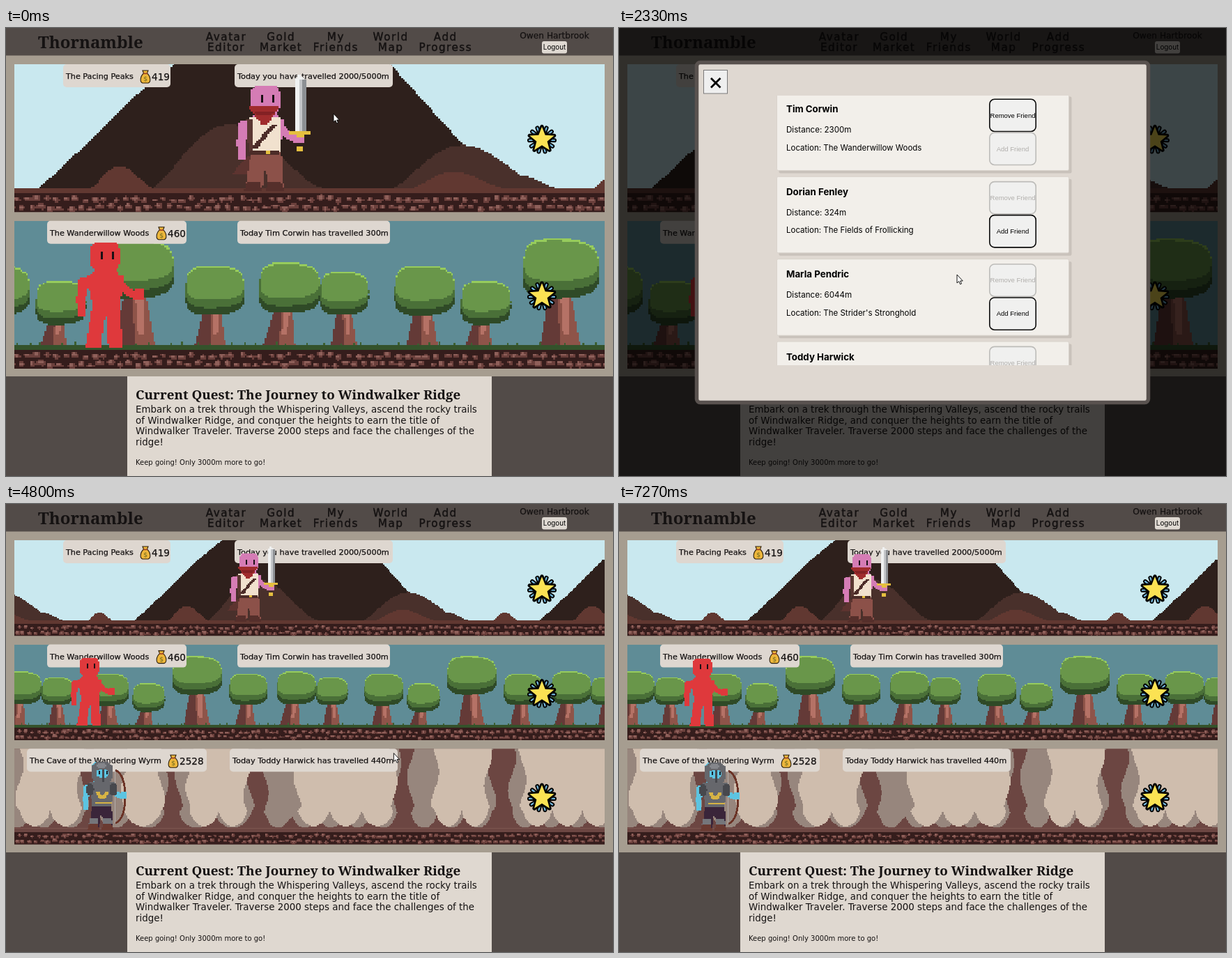
An HTML page for the animation above (7340 ms loop, 871 by 643 pixels).

```html
<!DOCTYPE html>
<html lang="en">
<head>
<meta charset="utf-8">
<title>Walking quest</title>
<style>
html, body { margin: 0; width: 100%; height: 100%; overflow: hidden; background: #524b48; }
svg { display: block; }
#stage { width: 871px; height: 643px; }
text { font-family: "DejaVu Sans", sans-serif; fill: #151212; white-space: pre; }
.bold { stroke: #151212; stroke-width: .25px; }
.nav { stroke: #151212; stroke-width: .45px; letter-spacing: 1.5px; }
.goth { font-family: "Noto Serif", serif; font-weight: 900; }
.card { font-family: Inter, sans-serif; fill: #000; }
.btn { font-family: "Liberation Sans", sans-serif; }
.tip { font-family: "Noto Sans", sans-serif; fill: #a09d9b; }
</style>
</head>
<body>
<svg id="stage" viewBox="0 0 871 643"></svg>
<script>
const LOOP = 7340, SMALL = .646, CELL = 2.65;
const OPEN = 1250, CLOSE = 4600;
const MIDX = 435.5, GROUND = 178, FEET = 182;
const stage = document.getElementById('stage');

let seed = 11;
const rnd = () => (seed = (seed * 16807) % 2147483647) / 2147483647;
const range = (n, f) => Array.from({ length: n }, (_, i) => f(i));
const art = (n, f) => range(n, f).join('');

// ---- drawing helpers ----
const rect = (x, y, w, h, fill, extra = '') =>
  `<rect x="${x}" y="${y}" width="${w}" height="${h}" fill="${fill}" ${extra}/>`;
const text = (x, y, str, size, cls = '', extra = '') =>
  `<text x="${x}" y="${y}" font-size="${size}" class="${cls}" ${extra}>${str}</text>`;
const mid = 'text-anchor="middle"';
const path = (d, fill) => `<path d="${d}" fill="${fill}"/>`;

// Fills a polygon on a coarse grid, giving stepped pixel-art edges.
function pixels(pts, s = CELL) {
  const ys = pts.map(p => p[1]), bottom = Math.max(...ys);
  let d = '';
  for (let r = Math.round(Math.min(...ys) / s); r * s < bottom - s / 2; r++) {
    const y = (r + .5) * s, xs = [];
    pts.forEach(([x1, y1], i) => {
      const [x2, y2] = pts[(i + 1) % pts.length];
      if (y1 <= y !== y2 <= y) xs.push(x1 + (y - y1) / (y2 - y1) * (x2 - x1));
    });
    xs.sort((a, b) => a - b);
    for (let i = 0; i + 1 < xs.length; i += 2) {
      const a = Math.round(xs[i] / s) * s, b = Math.round(xs[i + 1] / s) * s;
      if (b > a) d += `M${a.toFixed(2)} ${(r * s).toFixed(2)}H${b.toFixed(2)}v${s}H${a.toFixed(2)}z`;
    }
  }
  return d;
}
const shape = (fill, pts) => path(pixels(pts), fill);
const poly = (fill, s) => shape(fill, s.split(' ').map(p => p.split(',').map(Number)));

// Trapezoid from (x1, y1), w1 wide, down to (x2, y2), w2 wide.
const taper = (fill, x1, y1, w1, x2, y2, w2) =>
  shape(fill, [[x1 - w1 / 2, y1], [x1 + w1 / 2, y1], [x2 + w2 / 2, y2], [x2 - w2 / 2, y2]]);

function blob(cx, cy, w, h, fill, lump = 0, square = .75) {
  return shape(fill, range(32, i => {
    const a = i * Math.PI / 16, r = 1 + lump * Math.sin(3 * a + 1);
    const e = v => Math.sign(v) * Math.abs(v) ** square * r / 2;
    return [cx + e(Math.cos(a)) * w, cy + e(Math.sin(a)) * h];
  }));
}
const repeat = (period, top, tile) => art(3, i =>
  `<g transform="translate(${(i - 1) * period - MIDX} ${-top})">${tile}</g>`);
const wide = (y, h, fill) => rect(-660, y, 1320, h, fill);

// ---- scenery, in a strip 212 high centred on x = 0 ----
function dirt() {
  let base = '', light = '';
  for (let i = 0; i < 190; i++) {
    const cx = -660 + i * 7 + rnd() * 5, cy = 191 + i % 2 * 12 + rnd() * 5;
    const rx = 4 + rnd() * 4, ry = 2.8 + rnd() * 2.4;
    const stone = (k, shift) => range(6, j => {
      const a = j * Math.PI / 3 + i;
      return [cx - shift + Math.cos(a) * rx * k, cy - shift + Math.sin(a) * ry * k];
    });
    base += pixels(stone(1, 0));
    light += pixels(stone(.55, 1));
  }
  return wide(185, 28, '#351d1c') + path(base, '#6b403c') + path(light, '#8f605a');
}

const hill = (fill, x0, x1, h) => shape(fill, range(25, i =>
  [x0 + (x1 - x0) * i / 24, 230 - h * Math.sin(Math.PI * (i / 24) ** .88) ** 1.5]));

function peaks() {
  const brown = '#49302b', rust = '#613831';
  const tile = poly('#2e201c', '47,230 130,153 185,98 243,50 550,50 600,106 660,172 735,213 790,230') +
    hill(brown, 210, 455, 92) + hill(brown, 555, 775, 62) + hill(brown, 700, 790, 18) +
    hill(rust, 122, 212, 32) + hill(rust, 583, 714, 24) + hill(rust, 843, 899, 18);
  return wide(0, 212, '#c9e8ef') + repeat(900, 52, tile) + wide(GROUND, 7, rust);
}

function tree(x, w, top, lean) {
  const h = .6 * w + 20, y = top + h, foot = x + lean;
  const layer = (from, to, fill, k = 1) => blob(x, top + h * (from + to) / 2, w * k, h * (to - from), fill, .03, .7);
  return taper('#8e5449', x + lean / 2, y - 14, w * .26, foot, 456, w * .52) +
    taper('#643a37', x + lean / 2 - w * .08, y - 14, w * .1, foot - w * .13, 456, w * .26) +
    taper('#b57266', x + lean / 2 + w * .06, y - 14, w * .12, foot + w * .08, 440, w * .08) +
    layer(.15, 1, '#2f4a27') + layer(.06, .86, '#4a7038') +
    layer(0, .68, '#97cc5c', .97) + layer(.04, .7, '#69964a', .97);
}

function woods() {
  // centre, crown width, crown top, trunk lean
  const trees = [[299, 85, 341, -6], [406, 88, 337, -14], [485, 70, 350, 0], [600, 87, 341, -3], [688, 72, 363, -10], [795, 110, 303, 0]];
  return wide(0, 212, '#5f8c96') + repeat(610, 277, trees.map(t => tree(...t)).join('')) +
    art(60, i => rect(-655 + i * 22 + rnd() * 18, 173 + rnd() * 3, 2.6, 6, '#3c5f30')) +
    wide(GROUND, 7, '#34522b');
}

// A hanging slab with wavy sides and a rounded, lobed lower edge.
function rock(x0, x1, fill, depth) {
  const lobes = Math.max(1, Math.round((x1 - x0) / 65)), n = 12;
  const side = (x, dir) => range(n, i => [x + dir * 9 * Math.sin(i * .5 + x), i * 140 / n]);
  const base = range(25, i => [x1 + (x0 - x1) * i / 24,
    depth - 34 + 34 * Math.abs(Math.sin(Math.PI * lobes * i / 24)) ** .6]);
  return shape(fill, [...side(x0, -1), ...base.reverse(), ...side(x1, 1).reverse()]);
}

function cave() {
  const slabs = [[-680, -500, .8], [-470, -322, .6], [-290, -130, .85], [-100, 195, .75], [225, 405, .7], [450, 680, .9]];
  return wide(0, 212, '#6c4642') + slabs.map(([a, b, k]) =>
    rock(a, b, '#97867d', 176) + rock(b - (b - a) * k, b - 8, '#cfbdad', 172)).join('') +
    wide(GROUND - 2, 9, '#6c4642') + wide(GROUND - 2, 2, '#7c5650');
}

// ---- walkers: x = 0 is the body axis, y = 0 the soles ----
const eyes = rect(-4, -138, 3, 11, '#1a1014') + rect(12, -138, 3, 11, '#1a1014');
const head = skin => blob(2, -131, 42, 40, skin, 0, .45);
const legs = (fill, w) => taper(fill, -6, -60, w, -15, 0, w + 2) + taper(fill, 13, -60, w, 17, 0, w);
const boots = fill => taper(fill, -15, -12, 20, -16, 0, 26) + taper(fill, 15, -12, 20, 17, 0, 28);
const body = skin => legs(skin, 20) + taper(skin, 2, -114, 26, 2, -102, 44) + taper(skin, 3, -103, 54, 4, -57, 37) +
  taper(skin, -27, -102, 17, -33, -68, 12) + taper(skin, -33, -68, 12, -31, -44, 11) +
  poly(skin, '18,-101 42,-83 59,-85 59,-70 43,-69 20,-84') + head(skin);

const redWalker = () => body('#df393c') + eyes;

function pinkWalker() {
  const gold = '#e5bf3f', dark = '#4c2c28';
  return taper('#5d3430', -18, -50, 10, -36, -24, 22) + body('#d57cb5') +
    legs('#8c5149', 23) + boots('#552f2b') +
    taper('#f1e1ce', 2, -106, 46, 2, -56, 42) +
    taper('#5a3732', -21, -104, 9, -18, -56, 7) +
    taper(dark, 15, -96, 8, -13, -62, 8) +
    rect(-20, -58, 42, 6, dark) + rect(3, -58, 6, 5, gold) +
    taper('#a02c2d', 0, -122, 46, 1, -96, 10) + taper('#832124', 0, -115, 36, 1, -108, 14) + eyes +
    taper('#f0f1f1', 51, -168, 3, 51, -159, 14) + rect(45, -160, 8, 75, '#f0f1f1') +
    rect(53, -160, 8, 75, '#8d9094') + rect(51, -160, 4, 75, '#c4c6c9') +
    rect(36, -86, 31, 5, gold) + rect(47, -81, 11, 4, gold) + rect(47, -64, 9, 7, gold);
}

function blueWalker() {
  const steel = '#66676c', dark = '#47484d', gold = '#d6b344';
  return '<path d="M33 -133Q55 -124 55 -74T33 -15" fill="none" stroke="#6b3326" stroke-width="4.5"/>' +
    '<path d="M33 -133V-15" stroke="#b5adaa" stroke-width="1.8"/>' +
    body('#5cc4e1') + legs('#3a253a', 22) + boots('#6a3a31') +
    taper('#75767b', -14, -26, 18, -15, -12, 22) + taper('#75767b', 15, -26, 18, 16, -12, 22) +
    taper(steel, 3, -106, 56, 3, -54, 42) +
    [-23, 29].map(x => blob(x, -90, 17, 28, dark)).join('') +
    taper(gold, -6, -84, 10, 4, -68, 10) + taper(gold, 15, -84, 10, 4, -68, 10) + rect(-11, -62, 36, 4, gold) +
    blob(4, -128, 46, 46, steel, 0, .6) + blob(2, -143, 22, 10, '#85868b') +
    blob(5, -126, 27, 18, '#5cc4e1') + rect(4, -135, 5, 28, dark) +
    rect(-3, -132, 3, 8, '#17202a') + rect(13, -132, 3, 8, '#17202a');
}

// ---- strip furniture ----
const label = (x, y, w) => rect(x, y, w, 33, '#ded7d0', 'rx="5"');
function bag(x, y) {
  return `<g transform="translate(${x} ${y})" stroke="#2a1d0a" stroke-width="1.1">
    <path d="M-2.5 -5L-4 -9H4L2.500 -5C8 0 8 8 4 9H-4C-8 8 -8 0 -2.500 -5Z" fill="#ecb63b"/>
    <path d="M-3 -4.600H3" stroke="#9b3d22" stroke-width="1.6"/></g>` +
    text(x, y + 6, '$', 9, '', mid + ' style="fill:#6d6a1f"');
}
function star(y) {
  const spot = (i, r) => [r * Math.sin(i * Math.PI / 5), -r * Math.cos(i * Math.PI / 5)].map(v => v.toFixed(1)).join(' ');
  const rays = art(5, i => 'M0 0L' + spot(2 * i + .6, 18) + 'M0 0L' + spot(2 * i + 1.4, 18));
  return `<g transform="translate(769 ${y})" stroke-linejoin="round" stroke-linecap="round">
    <path d="${rays}" stroke="#000" stroke-width="6"/><path d="${rays}" stroke="#75b9df" stroke-width="2.2"/>
    <polygon points="${range(10, i => spot(i, i % 2 ? 8 : 18.5)).join(' ')}" fill="#fbe253" stroke="#000" stroke-width="5.5" paint-order="stroke"/></g>`;
}

// x and nx place the two labels; at holds the walker's x in the two- and three-strip layouts
const places = [
  { scene: 'peaks', name: 'The Pacing Peaks', gold: 419, news: 'Today you have travelled 2000/5000m',
    x: 82, w: 154, nx: 328, nw: 227, who: 'pink', at: [370, 347] },
  { scene: 'woods', name: 'The Wanderwillow Woods', gold: 460, news: 'Today Tim Corwin has travelled 300m',
    x: 59, w: 200, nx: 332, nw: 219, who: 'red', at: [140, 118.4] },
  { scene: 'cave', name: 'The Cave of the Wandering Wyrm', gold: 2528, news: 'Today Toddy Harwick has travelled 440m',
    x: 30, w: 258, nx: 321, nw: 241, who: 'blue', at: [157, 135.4] }];

function strip(p, y, h, k) {
  const layer = id => `<svg x="12" y="${y}" width="847" height="${h}" preserveAspectRatio="none"
    viewBox="${-423.5 / k} 0 ${847 / k} 212"><use href="#${id}"/></svg>`;
  const gx = p.x + p.w - (p.gold > 999 ? 39 : 27);
  return layer(p.scene) + label(p.x, y, p.w) + label(p.nx, y, p.nw) +
    text(p.x + 4, y + 21, p.name, 11.2, 'bold') + bag(gx - 9, y + 18) + text(gx, y + 23, p.gold, 13.6, 'bold') +
    text(p.nx + 4, y + 21, p.news, 11.3, 'bold') +
    `<g transform="translate(${p.at[k < 1 ? 1 : 0]} ${y + FEET * k}) scale(${k})"><g class="bob"><use href="#${p.who}"/></g></g>` +
    layer('dirt') + star(y + h / 2 + 2);
}

// ---- page ----
const nav = ['Avatar Editor', 'Gold Market', 'My Friends', 'World Map', 'Add Progress'];
const quest = ['Embark on a trek through the Whispering Valleys, ascend the rocky trails',
  'of Windwalker Ridge, and conquer the heights to earn the title of',
  'Windwalker Traveler. Traverse 2000 steps and face the challenges of the', 'ridge!'];

const page = rect(0, 0, 871, 643, '#524b48') + rect(0, 39.5, 871, 460.5, '#a69d90') +
  text(46, 29, 'Thornamble', 24, 'goth') +
  '<path id="hover" d="M433 0H512V34Q512 39 507 39H438Q433 39 433 34Z" fill="#a3a0a3"/>' +
  nav.map((item, i) => item.split(' ').map((word, j) =>
    text(316 + i * 78.7, 17.5 + j * 15.5, word, 15.2, 'nav', mid)).join('')).join('') +
  text(787, 15, 'Owen Hartbrook', 12.2, 'bold', mid) +
  rect(769, 19, 36, 17.5, '#dfd9d2', 'rx="3"') + text(787, 31, 'Logout', 9.8, 'card', mid) +
  `<g id="duo">${art(2, i => strip(places[i], 52 + i * 224.7, 212.3, 1))}</g>` +
  `<g id="trio">${art(3, i => strip(places[i], 52 + i * 149.6, 137.3, SMALL))}</g>` +
  rect(174, 500, 523, 143, '#dfd8d0') +
  text(186, 533, 'Current Quest: The Journey to Windwalker Ridge', 18.8, 'goth') +
  quest.map((s, i) => text(186, 551.8 + i * 15.8, s, 13.4)).join('') +
  text(186, 627, 'Keep going! Only 3000m more to go!', 10);

// ---- friends dialog ----
const friends = [['Tim Corwin', '2300m', 'The Wanderwillow Woods'], ['Dorian Fenley', '324m', 'The Fields of Frollicking'],
  ['Marla Pendric', '6044m', "The Strider's Stronghold"], ['Toddy Harwick', '10440m', 'The Cave of the Wandering Wyrm'],
  ['Gus Wexford', '10415m', 'The Cave of the Wandering Wyrm']];
const button = (y, str, on, id = '') =>
  rect(305.8, y + .8, 66.4, 46.2, '#f0f0ef', `${id} rx="7" stroke="${on ? '#0c0c0c' : '#bdbcb9'}" stroke-width="1.6"`) +
  text(339, y + 27.3, str, 9.5, 'btn', `${mid} style="fill:${on ? '#000' : '#b1afac'}"`);
const card = ([name, far, where], i) => `<g transform="translate(0 ${i * 118.35})">` +
  rect(3.5, 4, 420, 110, '#c9c2bb', 'rx="2"') +
  rect(.5, .5, 419, 109.5, '#f2efea', 'rx="2" stroke="#d9d3cc"') +
  text(14, 27, name, 13.3, 'card', 'font-weight="700"') + text(14, 55.7, `Distance: ${far}`, 11.6, 'card') +
  text(14, 81.5, `Location: ${where}`, 11.5, 'card') +
  button(7, 'Remove Friend', i === 0) + button(55, 'Add Friend', i > 0, i === 3 ? 'id="add"' : '') + '</g>';

const dialog = `<g id="dialog">${rect(0, 0, 871, 643, '#000', 'opacity=".7"')}
  ${rect(111.5, 49.5, 648, 488, '#dfd8d1', 'rx="5" stroke="#59524f" stroke-width="5.5"')}
  ${rect(121.5, 60.5, 34, 33.5, '#efefef', 'stroke="#7a7a7a"')}
  <path d="M132 72l13.500 13.500m0 -13.500l-13.500 13.500" stroke="#000" stroke-width="2.8"/>
  <svg x="226" y="97" width="424" height="387"><g id="list">${friends.map(card).join('')}</g></svg></g>`;

const overlay = `<g id="tip">${rect(0, 628, 62, 15, '#3b3837')}${text(4, 639, 'localhost:3000', 8.6, 'tip')}</g>
  <g id="cursor" stroke="#000" stroke-linejoin="round">
  <path id="arrow" d="M0 0V12L2.700 9.600 4.600 13.800 6.500 13 4.700 9H8.300Z" fill="#fff" stroke-width=".9"/>
  <path id="hand" d="M-1.500 1Q0 -1 1.300 1V5.500L7 7Q8 8 7.500 11L6.500 15H0L-4 9.500Q-4 7.500 -1.500 9Z" fill="#fff" stroke-width="1"/></g>`;

const symbols = { dirt, peaks, woods, cave, red: redWalker, pink: pinkWalker, blue: blueWalker };
stage.innerHTML = '<defs>' + Object.entries(symbols).map(([id, make]) =>
  `<g id="${id}" shape-rendering="crispEdges">${make()}</g>`).join('') + '</defs>' + page + dialog + overlay;

// ---- motion ----
const parts = {};
stage.querySelectorAll('[id]').forEach(el => parts[el.id] = el);
const bobs = stage.querySelectorAll('.bob');
const show = (el, on) => el.setAttribute('display', on ? 'inline' : 'none');
const move = (el, x, y) => el.setAttribute('transform', `translate(${x.toFixed(2)} ${y.toFixed(2)})`);
const ease = u => (u = Math.min(1, Math.max(0, u)), u * u * (3 - 2 * u));

// Cursor trips: start, end, then where it lands.
const trips = [[200, 750, 498, 32], [1300, 1750, 485, 354], [3320, 3620, 525, 400],
  [3620, 3930, 554, 334], [4650, 5100, 563, 424], [5700, 6300, -14, 578]];
function cursorAt(t) {
  return trips.reduce(([x, y], [from, to, tx, ty]) => {
    const u = ease((t - from) / (to - from));
    return [x + (tx - x) * u, y + (ty - y) * u];
  }, [470, 123]);
}

function draw(t) {
  const hover = t >= 640 && t < OPEN;
  show(parts.hover, hover);
  show(parts.hand, hover);
  show(parts.arrow, !hover);
  show(parts.dialog, t >= OPEN && t < CLOSE);
  show(parts.duo, t < CLOSE);
  show(parts.trio, t >= CLOSE);
  show(parts.tip, t >= 870 && t < 1720);
  parts.add.setAttribute('fill', t >= 3860 ? '#c5e7c0' : '#f0f0ef');
  move(parts.list, 0, -197 * ease((t - 2296) / 524));
  move(parts.cursor, ...cursorAt(t));
  const phase = t < CLOSE ? t : t - 5600;
  bobs.forEach(el => move(el, 0, 2.2 * Math.sin(phase / 1000 * 6 * Math.PI)));
}
function tick() {
  draw(performance.now() % LOOP);
  requestAnimationFrame(tick);
}
tick();
</script>
</body>
</html>
```
